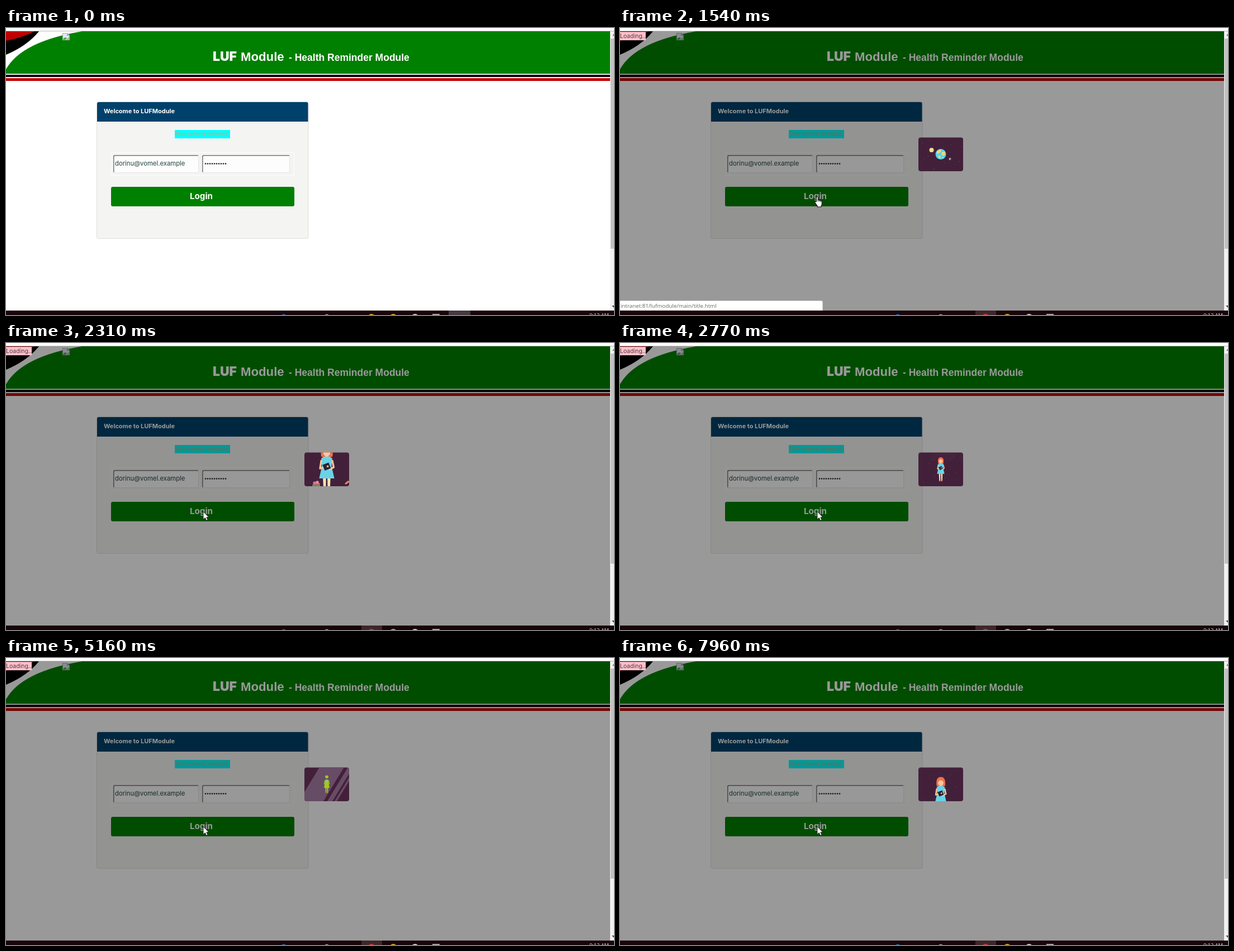
Animation, 1088 px wide and 515 px high, one loop 8 s. Source, as an HTML page with a canvas:

```html
<!DOCTYPE html>
<html lang="en">
<head>
<meta charset="utf-8">
<title>Login</title>
<style>
  html, body { margin: 0; width: 100%; height: 100%; overflow: hidden; background: #fff; }
  canvas { display: block; }
</style>
</head>
<body>
<canvas id="stage" width="1088" height="515"></canvas>
<script>
const c = document.getElementById('stage').getContext('2d');
const LOOP = 8000;
const SANS = 'Inter, sans-serif';
const ARIAL = '"Liberation Sans", sans-serif';

const clamp = v => Math.max(0, Math.min(1, v));
const ramp = (t, a, b) => clamp((t - a) / (b - a));
const smooth = p => p * p * (3 - 2 * p);
const mix = (a, b, p) => a + (b - a) * p;

function rect(x, y, w, h, color) {
  c.fillStyle = color;
  c.fillRect(x, y, w, h);
}

function rounded(x, y, w, h, r, color) {
  c.fillStyle = color;
  c.beginPath();
  c.roundRect(x, y, w, h, r);
  c.fill();
}

function oval(x, y, rx, ry, color) {
  c.fillStyle = color;
  c.beginPath();
  c.ellipse(x, y, rx, ry, 0, 0, Math.PI * 2);
  c.fill();
}

const dot = (x, y, r, color) => oval(x, y, r, r, color);

function shape(path, color) {
  c.fillStyle = color;
  c.fill(new Path2D(path));
}

function label(str, x, y, font, color, align = 'left') {
  c.font = font;
  c.fillStyle = color;
  c.textAlign = align;
  c.fillText(str, x, y);
}

function drawHeader() {
  rect(0, 0, 1088, 515, '#fff');
  rect(0, 5, 1088, 1, '#b9b9b9');
  rect(0, 6, 1081, 76, '#008000');
  shape('M0 6H136Q28 24 0 74Z', '#fff');
  shape('M0 6H59Q38 32 0 48Z', '#000');
  shape('M0 6H51Q30 17 0 23Z', '#c00000');
  rect(0, 82, 1081, 2, '#e4eee4');
  rect(0, 84, 1081, 4, '#0a0008');
  rect(0, 90, 1081, 5, '#c00000');

  // missing-image icon
  shape('M101 9H110L114 13V22H101Z', '#a9b3a9');
  shape('M102 10H109V14H113V16L107 21H102Z', '#dfe9f8');
  shape('M102 20Q105 15 109 18L106 21H102Z', '#55a545');

  label('LUF', 370, 59, '900 23px ' + SANS, '#fff');
  label('Module', 420, 59, 'bold 22.2px ' + ARIAL, '#fff');
  label('- Health Reminder Module', 506, 59, 'bold 17.5px ' + ARIAL, '#fff');
}

function input(x, w) {
  rounded(x, 228, w, 32, 3, '#e6e6e6');
  shape(`M${x} 259V231Q${x} 228 ${x + 3} 228H${x + w - 1}L${x + w - 2} 230H${x + 2}V258Z`, '#777');
  rounded(x + 1.5, 229.5, w - 2.5, 29.5, 2, '#fdfdfd');
}

function drawForm() {
  rounded(162, 132, 379.5, 246, 4, '#dededc');
  rounded(163, 133, 377.5, 244, 3, '#f4f4f3');
  rounded(163, 133, 377.5, 35, [3, 3, 0, 0], '#00416b');
  label('Welcome to LUFModule', 175, 153, 'bold 11px ' + SANS, '#fff');

  rect(302, 183, 99, 15, '#00ffff');
  label('Slow network detected.', 351, 193, '8.6px ' + SANS, '#d9a26c', 'center');

  c.strokeStyle = '#fdfdfd';
  c.lineWidth = 1;
  c.strokeRect(188.5, 223.5, 327, 41);
  input(192, 153);
  input(351, 157);
  label('dorinu@vomel.example', 195, 247, '11.3px ' + SANS, '#24463f');
  for (let i = 0; i < 10; i++) dot(357 + i * 4, 243.5, 1.35, '#222');

  rounded(188, 285, 328, 35, 3, '#008000');
  label('Login', 349.5, 307, 'bold 15.2px ' + SANS, '#fff', 'center');
}

function drawChrome(t) {
  rect(1081, 6, 7, 501, '#f1f1f1');
  rect(1082, 19, 6, 377, '#c1c1c1');
  shape('M1085 14L1088 10V14Z', '#777');
  shape('M1084 498H1088V502Z', '#444');

  const clicked = t >= 1310;
  rect(0, 507, 1088, 8, '#180409');
  if (clicked) rect(636, 507, 37, 8, '#40262b');
  else rect(792, 507, 39, 8, '#443a40');
  dot(497, 520, 6.5, '#2a6fb0');
  dot(574, 519, 5.5, '#aaa5a5');
  dot(654, 520, 7, clicked ? '#c93a35' : '#d2a62e');
  dot(693, 520, 7, '#d2a62e');
  dot(732, 520, 7, '#d8d4d4');
  rect(763, 513, 13, 2, '#aaa5a5');
  label('9:13 AM', 1079, 519, '9.3px "Open Sans", sans-serif', '#ddd', 'right');
}

function drawStatus() {
  rounded(-3, 489, 366, 18, [0, 3, 0, 0], '#d0d0d0');
  rounded(-3, 490, 365, 17, [0, 3, 0, 0], '#fff');
  label('intranet:81/lufmodule/main/title.html', 1, 502, '9.8px "Open Sans", sans-serif', '#666');
}

function girl(x, y, s, tint, alpha = 1) {
  if (alpha <= 0) return;
  const skin = tint || '#fbc79b', hair = tint || '#f2704f';
  c.save();
  c.globalAlpha *= alpha;
  c.translate(x, y);
  c.scale(s, s);
  shape('M-3.2 8H-.6L-.8 21H-2.6ZM.5 8H3.1L2.6 21H.8Z', tint || '#fbe3ad');
  if (tint) {
    dot(0, -15.4, 3.5, tint);
  } else {
    shape('M-4.6 -9Q-6 -19 0 -19Q6 -19 4.8 -9Q0 -7 -4.6 -9Z', hair);
    rect(-1.2, -11, 2.4, 4, skin);
    oval(0, -12.8, 3, 3.7, skin);
    shape('M-3.4 -12.5Q-4 -18 0 -17.8Q4 -18 3.4 -12.5Q3 -15 -1 -15.4Z', hair);
    rect(-2.8, 20.5, 2.2, 1.5, '#ed7a4e');
    rect(.6, 20.5, 2.2, 1.5, '#ed7a4e');
  }
  shape('M-2 -9H2L4.6 -7.6L4 -1L6.3 9.3H-6.3L-4 -1L-4.6 -7.6Z', tint || '#68d3e6');
  c.strokeStyle = skin;
  c.lineWidth = 1.5;
  c.lineJoin = 'round';
  c.stroke(new Path2D('M-4.5 -6L-5.6 1L-1 -.5M4.5 -6L5.8 0L2 2'));
  if (!tint) {
    shape('M-3.6 -2L1.5 -4L3.4 .8L-1.6 2.8Z', '#2a2030');
    shape('M-.3 -1.2L1.2 -1.8L1.8 -.4L.3 .2Z', '#e8b49a');
  }
  c.restore();
}

function stars(t) {
  for (let i = 0; i < 26; i++) {
    const x = 536 + (i * 47.3) % 76, y = 199 + (i * 29.7) % 56;
    c.globalAlpha = .3 + .25 * Math.sin(i * 2 + t / 400);
    dot(x, y, .55, i % 3 ? '#a46a86' : '#d7a0a8');
  }
  c.globalAlpha = 1;
}

function planet(t) {
  const grow = ramp(t, 2080, 2270);
  if (grow >= 1) return;
  c.save();
  c.globalAlpha = 1 - ramp(t, 2190, 2270);
  c.translate(574, 226.5);
  c.scale(1 + grow * 5, 1 + grow * 5);
  const turn = (Math.min(t, 2160) - 1540) / 1500;
  const orbit = (x, y) => [
    x * Math.cos(turn) - y * Math.sin(turn),
    x * Math.sin(turn) + y * Math.cos(turn)
  ];
  dot(...orbit(-16.5, -7.5), 4, '#f3dc8e');
  dot(...orbit(16.5, 8.5), 2, '#b8b3c0');
  dot(...orbit(17.5, 9), .8, '#604a60');
  dot(0, 0, 9.5, '#4ed5ea');
  shape('M-7 -5Q-3 -10 1 -8L0 -4L-4 -1L-7 -1ZM2 -4L7 -5L8 1L4 3L1 0ZM-5 2L0 3L-1 8L-4 6ZM3 5L6 5L3 8Z', '#ecd582');
  c.restore();
}

function stripes(alpha, shift) {
  if (alpha <= 0) return;
  c.save();
  c.globalAlpha = alpha;
  c.translate(shift, -shift * 1.65);
  shape('M561 196H605L568 257H524ZM612 196H621L584 257H575ZM625 196H629L592 257H588Z', '#674c66');
  c.restore();
}

function garden(t) {
  const away = ramp(t, 2310, 2620);
  c.save();
  c.globalAlpha = ramp(t, 2200, 2300) * (1 - away);
  c.translate(0, away * 10);
  oval(555, 256, 7, 5, '#71865b');
  dot(552, 251, 2.6, '#e8718d');
  dot(557, 250, 2.8, '#ee8ba0');
  dot(560, 253, 2, '#d95f80');
  shape('M606 252L612 247L614 248V250L608 254Z', '#e68a5e');
  c.restore();
}

function scene(t) {
  c.save();
  c.beginPath();
  c.roundRect(534, 196.5, 80, 60.5, 4);
  c.clip();
  rect(534, 196, 80, 62, '#43203a');

  const enter = smooth(ramp(t, 2700, 3170));
  const leave = ramp(t, 6350, 6580);
  const band = enter * (1 - leave * .8) * (1 - ramp(t, 6580, 6900));
  c.save();
  if (t < 3170 || t > 6600) stars(t);
  c.restore();
  stripes(band, (1 - enter) * 30);
  planet(t);

  if (t < 3200) {
    garden(t);
    const out = smooth(ramp(t, 2330, 2940));
    const s = mix(2.15, .8, out), y = mix(223, 225.5, out);
    const green = ramp(t, 2900, 3170);
    girl(574, y, s, null, ramp(t, 2190, 2290) * (1 - green));
    girl(574, y, s, '#a5c91f', green);
  } else if (t < 6480) {
    const swap = ramp(t, 6350, 6480);
    girl(574, 225.5, .8, '#a5c91f', 1 - swap);
    c.globalAlpha = 1 - swap;
    const beat = t > 3690 && t < 5800 ? .25 * Math.sin((t - 3690) / 180) : 0;
    oval(574, 221, 1.8 + beat, 1.5 + beat, '#62d3c5');
    c.globalAlpha = 1;
    girl(574, 227, 1, null, swap);
  } else {
    const near = smooth(ramp(t, 6580, 7180));
    c.globalAlpha = 1 - ramp(t, 6600, 6900);
    rect(547, 248, 54, 1.3, '#92788c');
    c.globalAlpha = 1;
    girl(574, mix(227, 244, near), mix(1, 1.6, near), null);
  }
  c.restore();
}

const ARROW = 'M0 0V14L3.3 11L5.6 16L8 15L5.8 10.2H10Z';
const HAND = 'M2.4 9V1.6Q2.4 0 3.8 0Q5.2 0 5.2 1.6V6Q7.4 5.2 7.8 6.6Q9.8 6 10.2 7.4Q12.3 7 12.3 9V13Q12.3 15.4 11 16.6V18.5H4.2V17L.3 11.2Q-.8 9.2 .6 8.8Q1.5 8.6 2.4 9Z';

function cursor(t) {
  if (t < 440) return;
  const p = smooth(clamp(Math.floor((t - 440) / 78.8) / 9));
  const x = mix(950, 353, p), y = mix(484, 302, p);
  const hand = t < 1850 && x < 516 && y < 320;
  const path = new Path2D(hand ? HAND : ARROW);
  c.save();
  c.translate(hand ? x - 4 : x, y + .5);
  c.fillStyle = '#fff';
  c.fill(path);
  c.strokeStyle = '#111';
  c.lineWidth = hand ? 1.1 : .8;
  c.stroke(path);
  if (hand) c.stroke(new Path2D('M5.2 6V9M7.8 6.6V9M10.2 7.4V9.5'));
  c.restore();
}

function draw(t) {
  drawHeader();
  drawForm();
  const loading = t >= 1540;
  if (loading) {
    rect(0, 6, 1081, 501, 'rgba(0,0,0,.4)');
    rect(0, 7, 46, 15, '#ffc0cb');
    label('Loading..', 0, 18, '10.5px ' + SANS, '#4a3c42');
    scene(t);
  }
  if (t >= 1310 && t < 1850) drawStatus();
  drawChrome(t);
  cursor(t);
}

function frame() {
  draw(performance.now() % LOOP);
  requestAnimationFrame(frame);
}
frame();
</script>
</body>
</html>
```
